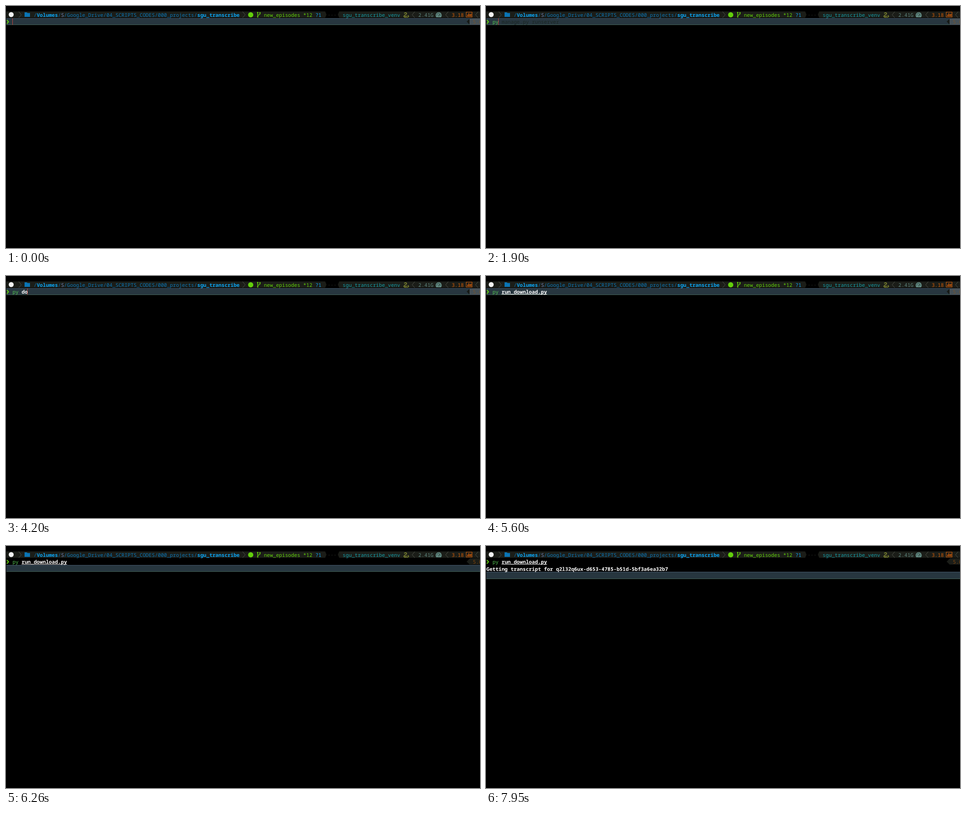
These frames come from a looping animation (1047 by 535 pixels, 8000 ms). An HTML page with a canvas:

```html
<!DOCTYPE html>
<html lang="en">
<head>
<meta charset="utf-8">
<title>Terminal session</title>
<style>
html, body { margin: 0; width: 100%; height: 100%; overflow: hidden; background: #000; }
canvas { display: block; }
</style>
</head>
<body>
<canvas id="stage" width="1047" height="535"></canvas>
<script>
const LOOP = 8000, WIDTH = 1047, HEIGHT = 535;
const CELL = 6.69, ROW = 15.3, TOP = 11.8;
const BAR = '#1b1d18', GUIDE = '#27363f', BLUE = '#0a74b4', SKY = '#0aa5f5', GREEN = '#62cf0c';
const ORANGE = '#cf5c0a', GRAY = '#51564d', WHITE = '#fff';
const ENTER_AT = 6160, OUTPUT_AT = 6910;
const ctx = document.getElementById('stage').getContext('2d');

// Command line contents and the moment each one appears
const typing = [
  [0, '', ''],
  [1600, 'p', ''],
  [1800, 'py', ''],
  [2500, 'py', ' '],
  [3900, 'py', ' d'],
  [4100, 'py', ' do'],
  [5400, 'py', ' run_download.py']
];

const colX = col => 1 + col * CELL;
const rowY = row => Math.floor(TOP + row * ROW);
const baseline = row => Math.round(TOP + row * ROW + 12.3);

function text(str, col, row, color, weight = 400) {
  ctx.font = `${weight} 11.15px "Noto Sans Mono", "DejaVu Sans Mono", monospace`;
  ctx.fillStyle = color;
  ctx.fillText(str, colX(col), baseline(row));
}

function rect(x, y, w, h, color) {
  ctx.fillStyle = color;
  ctx.fillRect(x, y, w, h);
}

function fillPath(points, color) {
  ctx.fillStyle = color;
  ctx.beginPath();
  points.forEach(([x, y]) => ctx.lineTo(x, y));
  ctx.fill();
}

function strokePath(points, color, width = 1) {
  ctx.strokeStyle = color;
  ctx.lineWidth = width;
  ctx.beginPath();
  points.forEach(([x, y]) => ctx.lineTo(x, y));
  ctx.stroke();
}

function disc(x, y, r, color) {
  ctx.fillStyle = color;
  ctx.beginPath();
  ctx.arc(x, y, r, 0, Math.PI * 2);
  ctx.fill();
}

function chevron(x, dir) {
  strokePath([[x - 3 * dir, 12.5], [x + 3 * dir, 19.5], [x - 3 * dir, 26]], GRAY);
}

function folder() {
  fillPath([[41, 14], [46, 14], [47.5, 15.5], [53, 15.5], [53, 24], [41, 24]], BLUE);
}

function branch() {
  strokePath([[556, 14], [556, 25]], GREEN, 1.5);
  strokePath([[561, 15], [561, 18], [556, 21.5]], GREEN, 1.5);
  [[556, 14.5], [561, 15], [556, 24]].forEach(([x, y]) => disc(x, y, 1.5, GREEN));
}

function snake() {
  ctx.strokeStyle = '#7d8730';
  ctx.lineWidth = 1.7;
  ctx.lineCap = 'round';
  ctx.beginPath();
  ctx.moveTo(880, 16);
  ctx.bezierCurveTo(884, 13, 887, 17, 883, 19);
  ctx.bezierCurveTo(876, 23, 879, 25, 884, 25);
  ctx.bezierCurveTo(889, 25, 891, 23, 888, 21);
  ctx.stroke();
  ctx.lineCap = 'butt';
  strokePath([[881, 23], [886, 22]], '#a89f45');
}

function gauge() {
  const color = '#5f8780';
  ctx.fillStyle = color;
  ctx.beginPath();
  ctx.arc(955.7, 20.5, 6.8, Math.PI * 0.85, Math.PI * 2.15);
  ctx.lineTo(961, 25);
  ctx.lineTo(950.5, 25);
  ctx.fill();
  [[951.5, 20], [953, 17], [955.7, 16], [959.8, 20]].forEach(([x, y]) => disc(x, y, 0.8, BAR));
  strokePath([[955.7, 23], [958, 17]], BAR);
}

function chart() {
  ctx.strokeStyle = ORANGE;
  ctx.lineWidth = 1;
  ctx.strokeRect(1016.5, 13.5, 13, 11);
  [[1019, 4], [1021.5, 7], [1024, 5], [1026.5, 6]].forEach(([x, h]) => rect(x, 23 - h, 1.6, h, ORANGE));
}

function statusBar() {
  fillPath([[1, 12], [705, 12], [708, 19], [705, 26], [1, 26]], BAR);
  fillPath([[WIDTH, 12], [736, 12], [733, 19], [736, 26], [WIDTH, 26]], BAR);
  disc(11.5, 19, 5.5, '#f2f2f2');
  folder();
  disc(540.5, 19.5, 5.8, GREEN);
  branch();
  snake();
  gauge();
  chart();
  [31, 525.5].forEach(x => chevron(x, 1));
  [900, 974, 1040].forEach(x => chevron(x, -1));

  text('/', 9, 0, BLUE);
  text('Volumes', 10, 0, SKY, 700);
  text('/', 17, 0, BLUE);
  text('S', 18, 0, '#7182b5');
  text('/Google_Drive/04_SCRIPTS_CODES/000_projects/', 19, 0, BLUE);
  text('sgu_transcribe', 63, 0, SKY, 700);
  text('new_episodes *12', 85, 0, GREEN);
  text('?1', 102, 0, SKY);
  text('···', 106, 0, '#3c4038');
  text('sgu_transcribe_venv', 111, 0, '#149ba5');
  text('2.41G', 136, 0, '#5f8780');
  text('3.18', 147, 0, ORANGE);
}

function guideLine(row) {
  const y = rowY(row), bottom = rowY(row + 1);
  rect(1, y, WIDTH, bottom - y, GUIDE);
  rect(1, y, WIDTH, 1, '#45586c');
  rect(1, bottom - 1, WIDTH, 1, '#466459');
}

function rightPrompt(active) {
  const y = rowY(1);
  fillPath([[1024, y + 1], [1017.5, y + 7.5], [1024, y + 14]], active ? '#171b17' : BAR);
  rect(1024, y, 23, active ? 15 : 14, active ? '#465158' : BAR);
  text('5.0', 154, 1, active ? '#75532f' : '#80450f');
}

function commandLine(t) {
  const [, command, argument] = typing.findLast(step => t >= step[0]);
  const active = t < ENTER_AT;
  const complete = argument.endsWith('.py');
  const endCol = 2 + command.length + argument.length;

  rightPrompt(active);
  strokePath([[2, 31], [5.5, 35], [2, 39]], GREEN, 2);
  text(command, 2, 1, '#55c453', 500);
  if (command === 'py' && !argument) text('manage.py runserver', 5, 1, '#1b2722');
  text(argument.trim(), 5, 1, WHITE, complete ? 600 : 700);
  if (complete) rect(colX(5), baseline(1) + 1, 15 * CELL, 1, WHITE);
  if (active && t % 1200 < 750) rect(Math.floor(colX(endCol)), rowY(1), 1, 15, '#c4453d');
}

function draw(t) {
  rect(0, 0, WIDTH, HEIGHT, '#000');
  guideLine(t < ENTER_AT ? 1 : t < OUTPUT_AT ? 2 : 3);
  statusBar();
  commandLine(t);
  if (t >= OUTPUT_AT) {
    text('Getting transcript for q2l32q6ux-d653-4785-b51d-5bf3a6ea32b7', 0, 2, WHITE, 600);
  }
}

ctx.textRendering = 'geometricPrecision';
const start = performance.now();
function tick() {
  draw((performance.now() - start) % LOOP);
  requestAnimationFrame(tick);
}
tick();
</script>
</body>
</html>
```
